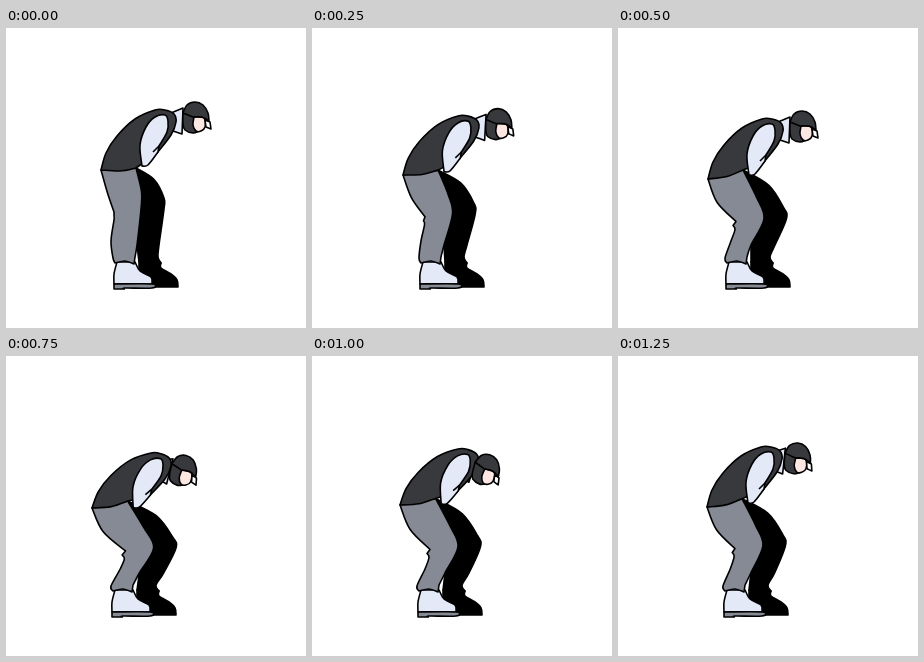
An HTML page with a canvas that plays this animation: 300x300 px, repeating every 1.5 s.

```html
<!DOCTYPE html>
<html lang="en">
<head>
<meta charset="utf-8">
<title>Stooping walker</title>
<style>
html, body { margin: 0; width: 100%; height: 100%; overflow: hidden; background: #fff; }
canvas { display: block; width: 300px; height: 300px; }
</style>
</head>
<body>
<canvas id="stage" width="300" height="300"></canvas>
<script>
const ctx = document.getElementById('stage').getContext('2d');
const DARK = '#38393d', GREY = '#868a94', PALE = '#e3e9f7', SKIN = '#fde7e3', INK = '#000';
const HOLD = 250;

// The figure is rigid apart from: hip place, torso lean (deg), head nod, knee bend.
const poses = [
  { hip: [95, 142], lean: 0, nod: 0, bend: 0 },
  { hip: [91, 147], lean: 1, nod: 0, bend: .5 },
  { hip: [90, 151], lean: 0, nod: 0, bend: 1 },
  { hip: [86, 152], lean: 5, nod: 7, bend: 1.15 },
  { hip: [88, 149], lean: 4, nod: 11, bend: 1 },
  { hip: [89, 151], lean: 0, nod: 4, bend: .9 }
];

const rad = deg => deg * Math.PI / 180;
const add = (p, x, y) => [p[0] + x, p[1] + y];
const mid = (a, b) => [(a[0] + b[0]) / 2, (a[1] + b[1]) / 2];

function turn([x, y], deg) {
  const c = Math.cos(rad(deg)), s = Math.sin(rad(deg));
  return [x * c - y * s, x * s + y * c];
}

// Smooth curve through the points of one run; runs meet in corners.
function trace(pts) {
  ctx.lineTo(...pts[0]);
  for (let i = 0; i < pts.length - 1; i++) {
    const a = pts[i], b = pts[i + 1];
    const before = pts[i - 1] || a, after = pts[i + 2] || b;
    ctx.bezierCurveTo(
      a[0] + (b[0] - before[0]) / 6, a[1] + (b[1] - before[1]) / 6,
      b[0] - (after[0] - a[0]) / 6, b[1] - (after[1] - a[1]) / 6, ...b);
  }
}

function shape(fill, ...runs) {
  ctx.beginPath();
  runs.forEach(trace);
  ctx.closePath();
  ctx.fillStyle = fill;
  ctx.fill();
  ctx.stroke();
}

function placed([x, y], deg, paint) {
  ctx.save();
  ctx.translate(x, y);
  ctx.rotate(rad(deg));
  paint();
  ctx.restore();
}

function drawFeet() {
  shape(INK,
    [[132, 234], [143, 231], [154, 235]],
    [[154, 235], [154, 240], [164, 246], [170, 252], [171, 259]],
    [[146, 259], [132, 241]]);
  shape(PALE,
    [[110, 234], [107, 246], [107, 256]],
    [[145, 256], [144, 249], [133, 243], [128, 234]]);
  shape(GREY, [[107, 256], [145, 256], [145, 260], [118, 260], [117, 261], [107, 261]].map(p => [p]).flat());
}

function drawLegs(hip, front, bend, shift) {
  const kneeY = 181 + 9.5 * bend;
  const back = [108 + 10 * bend, kneeY + 3];
  const fore = [135 + 11 * bend, kneeY];
  const far = [158 + 10.5 * bend, kneeY];
  const foot = (x, y) => [x + shift, y];

  shape(INK,
    [front, add(mid(front, far), 4, -9), add(far, -3 * bend, -11), far,
      [153 + 4 * bend, 217], foot(151, 229), foot(154, 235)],
    [foot(132, 234)],
    [[131 + 2 * bend, 217], fore]);
  placed([shift, 0], 0, drawFeet);
  shape(GREY,
    [hip, add(mid(hip, back), -5 * bend, 2), back],
    [add(back, -3 * bend, 4), add(back, -bend, 8), [105 + 8 * bend, 213], foot(106, 230), foot(108, 235)],
    [foot(108, 235), foot(118, 233), foot(127, 236)],
    [foot(128, 229), [131 + 2 * bend, 217], fore, add(mid(front, fore), 3, 3), front]);
}

// Drawn from the hip.
function drawTorso(bottom) {
  shape(DARK,
    [[0, 0], [5, -17], [16, -34], [34, -51], [54, -60], [64, -60], [73, -56], [75, -48], [70, -35], [56, -17]],
    [bottom, [19, bottom[1] / 2 + 2], [0, 0]]);
  shape(PALE,
    [[41, -4], [39, -25], [45, -43], [54, -53], [64, -55], [67, -49], [66, -38], [58, -24]],
    [[57, -18], [47, -5], [41, -4]]);
  ctx.beginPath();
  trace([[58, -24], [52, -18]]);
  ctx.stroke();
}

// Drawn from the crown of the cap.
function drawNeck() {
  shape(PALE, [[-24, 11], [-12, 6]], [[-13, 32], [-22, 29]]);
}

function drawHead() {
  shape(DARK,
    [[-12, 10], [-12, 22], [-10, 28], [-2, 31], [4, 29]],
    [[8, 14], [-2, 10]]);
  shape(SKIN, [[-1, 15], [9, 16], [10, 25], [6, 29], [1, 29], [-2, 23], [-1, 15]]);
  shape('#fff', [[10, 18], [15, 20]], [[16, 27], [11, 25]]);
  shape(DARK,
    [[-12, 11], [-8, 3], [0, 0], [8, 3], [13, 11], [14, 19]],
    [[14, 19], [7, 15], [-2, 15]]);
}

function draw(now) {
  const { hip, lean, nod, bend } = poses[Math.floor(now / HOLD) % poses.length];
  const bottom = [35, -2 - 7 * bend];
  const front = add(turn(bottom, lean), ...hip);
  const crown = add(add(turn([94, -68], lean), ...hip), -.8 * nod, nod);
  const tilt = lean + nod;

  ctx.fillStyle = '#fff';
  ctx.fillRect(0, 0, 300, 300);
  ctx.strokeStyle = INK;
  ctx.lineWidth = 1.6;
  ctx.lineJoin = 'round';
  drawLegs(hip, front, bend, Math.sign(hip[0] - 89.5));
  placed(crown, tilt, drawNeck);
  placed(hip, lean, () => drawTorso(bottom));
  placed(crown, tilt, drawHead);
}

const start = performance.now();
function tick() {
  draw(performance.now() - start);
  requestAnimationFrame(tick);
}
tick();
</script>
</body>
</html>
```
